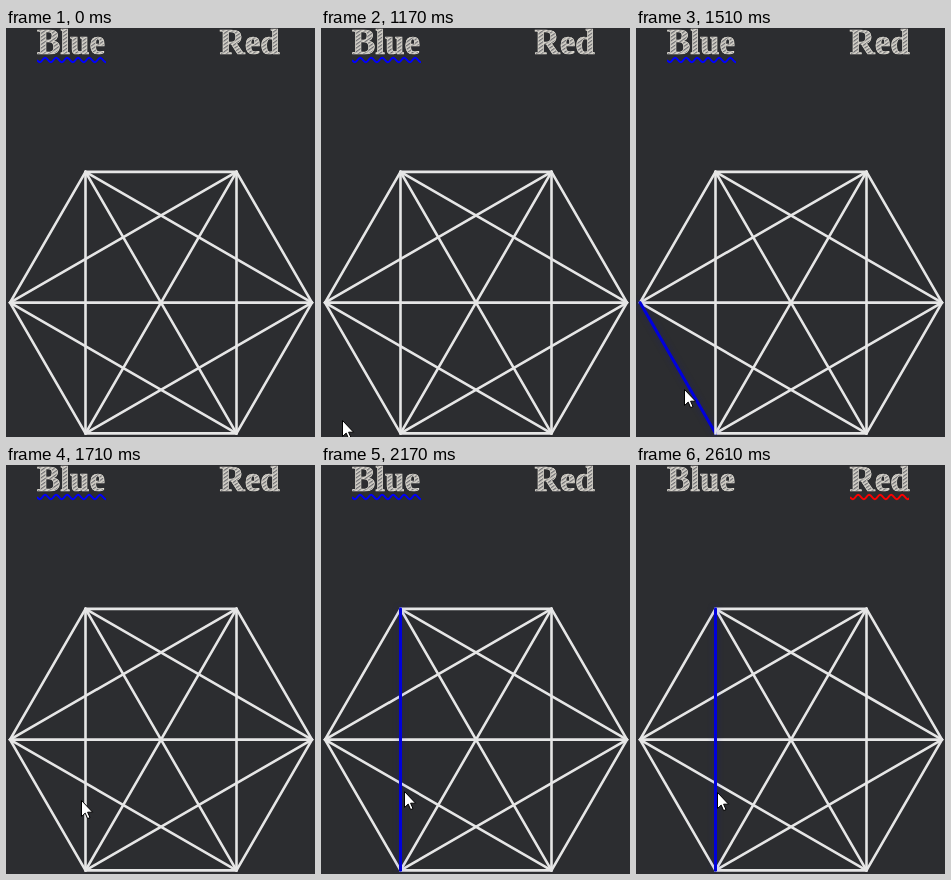
Write an HTML page that moves like this. It is 309x409 px and loops after 3.69 s.

```html
<!DOCTYPE html>
<html lang="en">
<head>
<meta charset="utf-8">
<title>Sim game</title>
<style>
  html, body { margin: 0; height: 100%; overflow: hidden; background: #2c2d30; }
  svg { display: block; width: 309px; height: 409px; }
  text { font: bold 35px "Liberation Serif", serif; fill: url(#chalk); stroke: #e6e3da; stroke-width: .7; }
  .wave { fill: none; stroke-width: 2; }
  #edges { stroke: #e6e6e6; stroke-width: 2.6; stroke-linecap: round; }
  #edges .on { stroke: #0000dc; stroke-width: 3; filter: drop-shadow(0 0 3px #0000dc40); }
</style>
</head>
<body>
<svg viewBox="0 0 309 409">
  <defs>
    <pattern id="chalk" width="3" height="3" patternUnits="userSpaceOnUse" patternTransform="rotate(-35)">
      <rect width="3" height="3" fill="#dad7ce"/>
      <rect width="3" height="1.3" fill="#6c6c70"/>
    </pattern>
    <clipPath id="underline">
      <rect x="31" y="28" width="69" height="9"/>
      <rect x="214" y="28" width="59" height="9"/>
    </clipPath>
  </defs>
  <text x="31" y="25.5">Blue</text>
  <text x="213.5" y="25.5">Red</text>
  <g clip-path="url(#underline)">
    <path class="wave" id="blueTurn" stroke="#00f"/>
    <path class="wave" id="redTurn" stroke="#f00"/>
  </g>
  <g id="edges"></g>
  <path id="cursor" d="M.5 .5V16.5L4.2 13.1 6.6 18.6 9 17.6 6.6 12.2H11.6Z" fill="#fff" stroke="#000"/>
</svg>
<script>
const LOOP = 3690;
const $ = id => document.getElementById(id);

// Cursor path: time, x, y
const path = [
  [980, 9, 408], [1350, 33, 377], [1490, 46, 362], [1510, 48, 361],
  [1710, 75, 335], [1820, 81, 329], [1940, 84, 326],
  [2150, 84, 326], [2170, 83, 326], [2310, 81, 327], [LOOP, 81, 327]
];

function wave(id, x) {
  $(id).setAttribute("d", `M${x} 32` + "c5.5 7.5 5.5 -7.5 11 0".repeat(7));
}
wave("blueTurn", 31);
wave("redTurn", 214);

// Complete graph on six corners, numbered from the left, clockwise
const corners = Array.from({ length: 6 }, (_, i) => {
  const a = Math.PI * (1 + i / 3);
  return [155 + 151 * Math.cos(a), 274.6 + 151 * Math.sin(a)];
});
const edges = {};
for (let i = 0; i < 6; i++) {
  for (let j = i + 1; j < 6; j++) {
    const line = document.createElementNS("http://www.w3.org/2000/svg", "line");
    const [[x1, y1], [x2, y2]] = [corners[i], corners[j]];
    for (const [k, v] of Object.entries({ x1, y1, x2, y2 })) line.setAttribute(k, v);
    $("edges").append(line);
    edges[`${i}${j}`] = line;
  }
}
$("edges").append(edges["05"], edges["15"]);

function cursorAt(t) {
  const i = path.findIndex(p => p[0] > t);
  const [a, b] = [path[i - 1], path[i]];
  const u = (t - a[0]) / (b[0] - a[0]);
  return [1, 2].map(k => Math.round(a[k] + (b[k] - a[k]) * u));
}

function show(el, visible) {
  el.style.visibility = visible ? "visible" : "hidden";
}

function draw(now) {
  const t = now % LOOP;
  show($("cursor"), t >= 980);
  if (t >= 980) $("cursor").setAttribute("transform", `translate(${cursorAt(t)})`);
  edges["05"].classList.toggle("on", t >= 1510 && t < 1580);
  edges["15"].classList.toggle("on", t >= 1730);
  show($("blueTurn"), t < 2490);
  show($("redTurn"), t >= 2490);
}

const start = performance.now();
function tick() {
  draw(performance.now() - start);
  requestAnimationFrame(tick);
}
tick();
</script>
</body>
</html>
```
